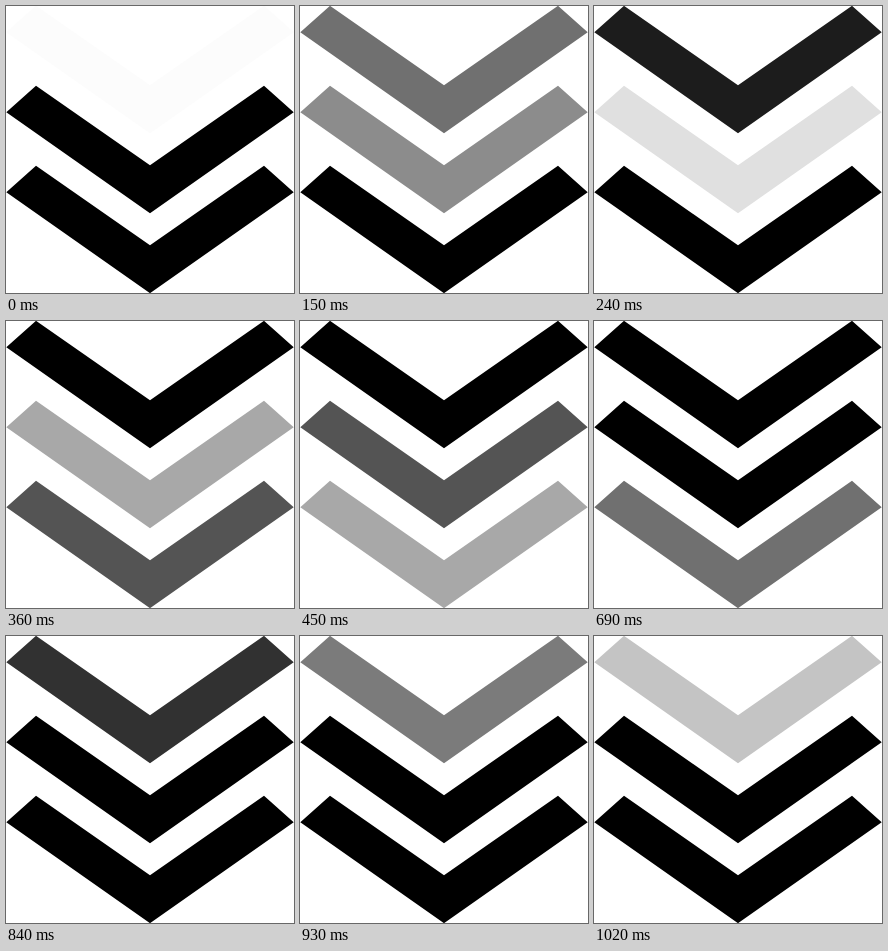
An HTML page without scripts for the animation above (1050 ms loop, 288 px wide and 287 px high).

```html
<!DOCTYPE html>
<html lang="en">
<head>
<meta charset="utf-8">
<title>Scroll chevrons</title>
<style>
  html, body { margin: 0; width: 100%; height: 100%; overflow: hidden; background: #fff; }
  svg { display: block; width: 288px; height: 287px; }
  use { animation: 1050ms infinite; }
  .top { animation-name: top; }
  .mid { animation-name: mid; }
  .low { animation-name: low; }

  /* one grey step every 30 ms */
  @keyframes top {
    0%      { fill: rgb(252, 252, 252); animation-timing-function: steps(9); }
    25.714% { fill: rgb(0, 0, 0); animation-timing-function: step-end; }
    74.285% { fill: rgb(0, 0, 0); animation-timing-function: steps(8); }
    97.142% { fill: rgb(196, 196, 196); animation-timing-function: step-end; }
    100%    { fill: rgb(252, 252, 252); }
  }
  @keyframes mid {
    0%      { fill: rgb(0, 0, 0); animation-timing-function: steps(9); }
    25.714% { fill: rgb(252, 252, 252); animation-timing-function: steps(9); }
    51.428%, 100% { fill: rgb(0, 0, 0); }
  }
  @keyframes low {
    0%      { fill: rgb(0, 0, 0); }
    25.714% { fill: rgb(0, 0, 0); animation-timing-function: steps(9); }
    51.428% { fill: rgb(252, 252, 252); animation-timing-function: steps(9); }
    77.142%, 100% { fill: rgb(0, 0, 0); }
  }
</style>
</head>
<body>
<svg viewBox="0 0 288 287">
  <defs>
    <path id="chevron" d="M30 -.2 144 79.3 258 -.2 287.7 26.2 144 127.2 .3 26.2Z"/>
  </defs>
  <use class="top" href="#chevron"/>
  <use class="mid" href="#chevron" y="80"/>
  <use class="low" href="#chevron" y="160"/>
</svg>
</body>
</html>
```
